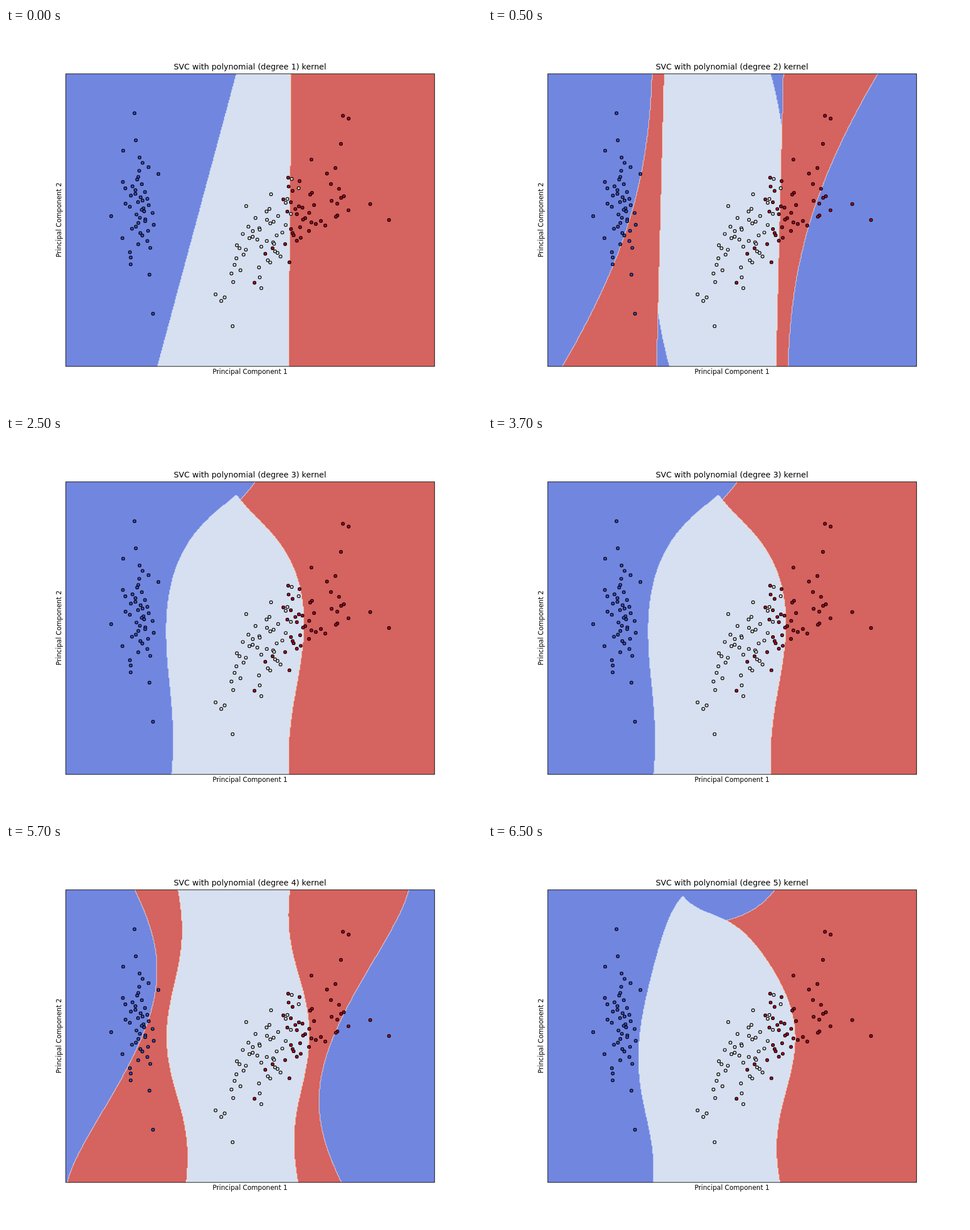
An HTML page with a canvas for the animation above (8000 ms loop, 837 by 669 pixels).

```html
<!DOCTYPE html>
<html lang="en">
<head>
<meta charset="utf-8">
<title>SVC kernels</title>
<style>
html, body { margin: 0; width: 100%; height: 100%; overflow: hidden; background: #fff; }
canvas { display: block; }
</style>
</head>
<body>
<canvas id="plot" width="837" height="669"></canvas>
<script>
const ctx = document.getElementById('plot').getContext('2d');

// Plot area in whole pixels, and the data origin inside it.
const AREA = { x: 105, y: 81, w: 649, h: 515 };
const ORIGIN_X = 408, ORIGIN_Y = 338, UNIT = 100;
const CELL_W = 1.606, CELL_H = 1.4;
const RAMP = ['#7186df', '#92aef9', '#b5ceff', '#d7e0f0', '#f0dcd1', '#f9c1a9', '#f09982', '#d5635f'];

// Key points on the three pairwise boundaries of each kernel degree.
// Without a constant term the kernel of degree d gives P(u, v) = 1,
// where P is a homogeneous polynomial of degree d.
const quarticOuter = [[226, 80], [253, 147], [267, 223], [243, 336], [205, 407], [148, 503], [114, 586],
  [178, 630], [268, 630]];
const kernels = [
  {
    blueLight: [[405, 80], [266, 596]],
    redLight: [[501.5, 80], [497, 596]],
    blueRed: [[380, 80], [360, 596]]
  },
  {
    blueLight: [[308, 80], [299, 501], [319, 596]],
    redLight: [[309.5, 80], [303, 338], [296.5, 596]],
    blueRed: [[288.5, 80], [257, 309], [130.5, 596]]
  },
  {
    blueLight: [[405, 103], [307, 212], [281.5, 350], [291, 596]],
    redLight: [[405, 103], [500, 219], [524, 330], [497.5, 596]],
    blueRed: [[439, 80], [428, 94], [413, 112], [358, 338]]
  },
  {
    blueLight: quarticOuter,
    redLight: [[302, 80], [309.5, 150], [282.5, 350], [293, 415], [319, 550], [316.5, 596]],
    blueRed: quarticOuter
  },
  {
    blueLight: [[342, 92], [310, 152], [278, 270], [264.5, 385], [272, 450], [290.5, 596]],
    redLight: [[342, 92], [382, 118], [420, 134.5], [480, 190], [527, 272], [540, 350], [508.5, 530], [513.5, 596]],
    blueRed: [[505, 80], [445, 126], [420, 134.5], [306, 217], [288, 338], [289, 486]]
  }
];

// Least-squares coefficients of P through the key points.
function fit(degree, points) {
  const n = degree + 1;
  const rows = points.map(([x, y]) => {
    const u = (x - ORIGIN_X) / UNIT, v = (ORIGIN_Y - y) / UNIT;
    return Array.from({ length: n }, (_, k) => u ** (degree - k) * v ** k);
  });
  const sum = f => rows.reduce((total, row) => total + f(row), 0);
  const m = Array.from({ length: n }, (_, i) =>
    Array.from({ length: n + 1 }, (_, j) => sum(row => row[i] * (j < n ? row[j] : 1))));
  for (let i = 0; i < n; i++) {
    let pivot = i;
    for (let r = i + 1; r < n; r++) if (Math.abs(m[r][i]) > Math.abs(m[pivot][i])) pivot = r;
    [m[i], m[pivot]] = [m[pivot], m[i]];
    for (let r = 0; r < n; r++) {
      if (r === i) continue;
      const f = m[r][i] / m[i][i];
      for (let j = i; j <= n; j++) m[r][j] -= f * m[i][j];
    }
  }
  return m.map((row, i) => row[n] / row[i]);
}

function evaluate(coefs, u, v) {
  let total = 0, power = 1;
  for (const c of coefs) {
    total = total * u + c * power;
    power *= v;
  }
  return total;
}

// One-against-one vote on every mesh node; a three-way tie goes to class 0.
function classifyMesh(kernel, degree) {
  const cols = Math.ceil(AREA.w / CELL_W) + 2, rows = Math.ceil(AREA.h / CELL_H) + 2;
  const blueLight = fit(degree, kernel.blueLight);
  const redLight = fit(degree, kernel.redLight);
  const blueRed = fit(degree, kernel.blueRed);
  const mesh = new Uint8Array(cols * rows);
  for (let j = 0; j < rows; j++) {
    const v = (ORIGIN_Y - AREA.y - j * CELL_H) / UNIT;
    for (let i = 0; i < cols; i++) {
      const u = (AREA.x + i * CELL_W - ORIGIN_X) / UNIT;
      const beatsLight = evaluate(redLight, u, v) > 1;
      if (!beatsLight && evaluate(blueLight, u, v) <= 1) mesh[j * cols + i] = 1;
      else if (beatsLight && evaluate(blueRed, u, v) <= 1) mesh[j * cols + i] = 2;
    }
  }
  return { mesh, cols };
}

// Filled contours of the class values in eight levels, at double resolution.
function contour(kernel, index) {
  const { mesh, cols } = classifyMesh(kernel, index + 1);
  const canvas = document.createElement('canvas');
  canvas.width = AREA.w * 2;
  canvas.height = AREA.h * 2;
  const g = canvas.getContext('2d');
  const image = g.createImageData(canvas.width, canvas.height);
  const pixels = new Uint32Array(image.data.buffer);
  const colors = RAMP.map(hex => {
    const c = parseInt(hex.slice(1), 16);
    return (0xff000000 | (c & 255) << 16 | c & 0xff00 | c >> 16) >>> 0;
  });
  for (let y = 0, p = 0; y < canvas.height; y++) {
    const gy = (y + 0.5) / 2 / CELL_H, j = Math.floor(gy), fy = gy - j;
    for (let x = 0; x < canvas.width; x++, p++) {
      const gx = (x + 0.5) / 2 / CELL_W, i = Math.floor(gx), fx = gx - i;
      const k = j * cols + i;
      const upper = mesh[k] + (mesh[k + 1] - mesh[k]) * fx;
      const lower = mesh[k + cols] + (mesh[k + cols + 1] - mesh[k + cols]) * fx;
      const level = Math.ceil((upper + (lower - upper) * fy) * 4 - 1e-9) - 1;
      pixels[p] = colors[Math.max(0, Math.min(7, level))];
    }
  }
  g.putImageData(image, 0, 0);
  return canvas;
}

function makeRandom(seed) {
  return () => {
    seed = seed + 0x6d2b79f5 | 0;
    let t = Math.imul(seed ^ seed >>> 15, 1 | seed);
    t = t + Math.imul(t ^ t >>> 7, 61 | t) ^ t;
    return ((t ^ t >>> 14) >>> 0) / 4294967296;
  };
}

// Clusters: logistic spread in y, tilted and jittered in x, plus outliers.
const clusters = [
  { color: '#3b4cc0', x: 229, y: 316, spread: 34, tilt: 0, jitter: 17, seed: 4,
    outliers: [[226, 150], [258.5, 503]] },
  { color: '#dddcdc', x: 450, y: 370, spread: 30, tilt: -0.42, jitter: 29, seed: 11,
    outliers: [[398.5, 525], [368.5, 469], [378.5, 480.5]] },
  { color: '#b40426', x: 540, y: 322, spread: 26, tilt: -0.3, jitter: 36, seed: 8,
    outliers: [[592.5, 154.5], [602.5, 159.5], [589, 204], [673.5, 338], [640.5, 310], [437, 448.5]] }
];

function scatter({ color, x, y, spread, tilt, jitter, seed, outliers }) {
  const random = makeRandom(seed);
  const points = [...outliers];
  const count = 50 - outliers.length;
  for (let i = 0; i < count; i++) {
    const p = 0.03 + 0.94 * i / (count - 1);
    const dy = spread * Math.log(p / (1 - p));
    const noise = random() + random() + random() - 1.5;
    points.push([x + tilt * dy + 2 * jitter * noise, y + dy]);
  }
  ctx.fillStyle = color;
  ctx.strokeStyle = '#000';
  ctx.lineWidth = 1.2;
  for (const [px, py] of points) {
    ctx.beginPath();
    ctx.arc(px, py, 2.6, 0, 2 * Math.PI);
    ctx.fill();
    ctx.stroke();
  }
}

function label(text, x, y, size, turn = 0) {
  ctx.save();
  ctx.translate(x, y);
  ctx.rotate(turn);
  ctx.font = size + 'px "DejaVu Sans", sans-serif';
  ctx.textAlign = 'center';
  ctx.fillStyle = '#000';
  ctx.fillText(text, 0, 0);
  ctx.restore();
}

const regions = kernels.map(contour);

function draw(degree) {
  ctx.fillStyle = '#fff';
  ctx.fillRect(0, 0, 837, 669);
  ctx.drawImage(regions[degree - 1], AREA.x, AREA.y, AREA.w, AREA.h);
  clusters.forEach(scatter);
  ctx.strokeStyle = '#000';
  ctx.lineWidth = 0.92;
  ctx.strokeRect(105.04, 80.7, 648.66, 515.1);
  label(`SVC with polynomial (degree ${degree}) kernel`, 429, 73.4, 13.95);
  label('Principal Component 1', 429, 609.3, 11.62);
  label('Principal Component 2', 97.2, 338, 11.62, -Math.PI / 2);
}

let shown = 0;
function tick() {
  const t = performance.now() % 8000;
  const degree = t < 500 ? 1 : 2 + Math.floor((t - 500) / 2000);
  if (degree !== shown) draw(shown = degree);
  requestAnimationFrame(tick);
}
tick();
</script>
</body>
</html>
```
